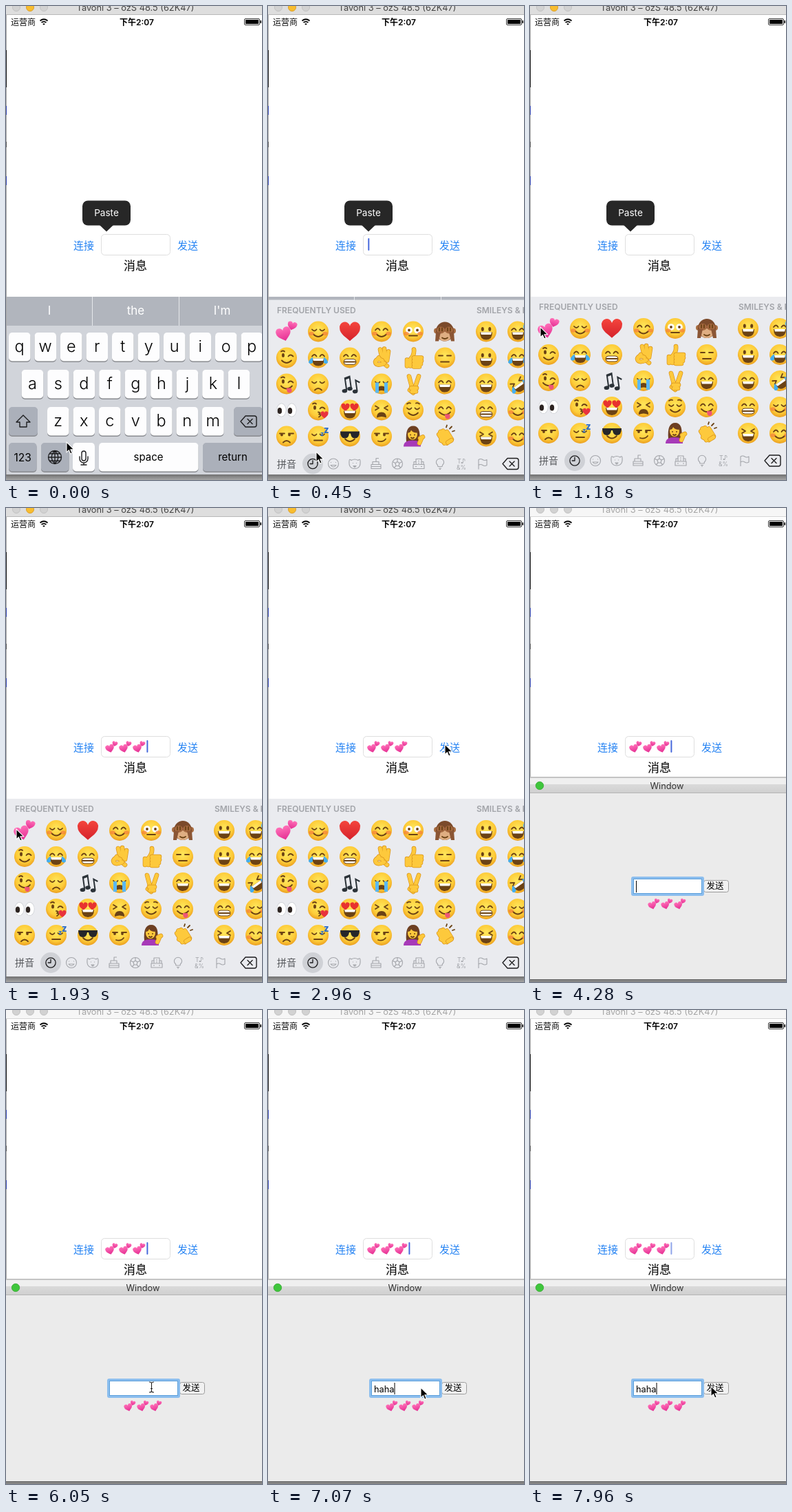
Write an HTML page that moves like this. It is 372 by 688 pixels and loops after 8000 ms.

```html
<!DOCTYPE html>
<html lang="zh">
<head>
<meta charset="utf-8">
<title>Messages</title>
<style>
  html, body { margin: 0; width: 100%; height: 100%; overflow: hidden; background: #fff; }
  svg { display: block; }
  text { font-family: Inter, "Noto Sans CJK SC", "Noto Sans CJK", sans-serif; white-space: pre; }
  .l { fill: none; stroke: #6b4214; stroke-width: 1.8; stroke-linecap: round; stroke-linejoin: round; }
  .icon { fill: none; stroke: #a3a5aa; stroke-width: 1.1; stroke-linejoin: round; }
  .dark { fill: none; stroke: #1d1d1f; stroke-width: 1.4; stroke-linejoin: round; stroke-linecap: round; }
</style>
</head>
<body>
<script>
const BROWN = '#6b4214', BLUE = '#2583f3';

// Markup helpers
const G = (x, y, body, more = '') => `<g transform="translate(${x} ${y}) ${more}">${body}</g>`;
const R = (x, y, w, h, fill, rx = 0, more = '') =>
  `<rect x="${x}" y="${y}" width="${w}" height="${h}" fill="${fill}" rx="${rx}" ${more}/>`;
const O = (x, y, rx, fill, ry = rx) => `<ellipse cx="${x}" cy="${y}" rx="${rx}" ry="${ry}" fill="${fill}"/>`;
const F = (d, fill) => `<path d="${d}" fill="${fill}"/>`;
const L = (d, cls = 'l') => `<path d="${d}" class="${cls}"/>`;
const T = (x, y, s, size, fill = '#000', more = 'text-anchor="middle"') =>
  `<text x="${x}" y="${y}" font-size="${size}" fill="${fill}" ${more}>${s}</text>`;
const use = (id, x, y, k = 1) => `<use href="#${id}" transform="translate(${x} ${y}) scale(${k})"/>`;
const part = (id, body) => `<g id="${id}">${body}</g>`;
const both = m => m + `<g transform="scale(-1 1)">${m}</g>`;

// Emoji
const HEART = 'M0 12C-4 8-13 3-13-4A6.6 6.6 0 0 1 0-7A6.6 6.6 0 0 1 13-4C13 3 4 8 0 12Z';
const heart = (x, y, k, fill, turn = 0) => G(x, y, F(HEART, fill), `rotate(${turn}) scale(${k})`);

const eyes = {
  dot: both(O(5.2, -3.5, 2, BROWN, 3)),
  arc: both(L('M2.5-2q3-5 6.5 0')),
  shut: both(L('M2.5-3q3 4 6.5 0')),
  flat: both(L('M3-3h6')),
  wink: O(-5, -3.5, 2, BROWN, 3) + L('M2.5-2q3-4 7 0M-8-9q3-2 5 0'),
  pinch: both(L('M9-6l-5 3 5 3')),
  love: both(heart(6.5, -4, .46, '#e8322f')),
  wide: both(O(6, -2, 4.8, '#fff') + O(6, -2, 1.9, BROWN)),
  cool: F('M-14-7H14q0 10-7 10-5 0-6-7h-2q-1 7-6 7-7 0-7-10z', '#25262a'),
  side: both(L('M3-4h7')) + O(-7, -2, 1.9, BROWN) + O(4, -2, 1.9, BROWN)
};
const mouths = {
  smile: L('M-7 4q7 7 14 0'),
  open: F('M-9 1H9q0 11-9 11T-9 1z', BROWN) + F('M-8 1H8l-1 3.5H-7z', '#fff'),
  teeth: R(-9, 2, 18, 8, '#fff', 4, `stroke="${BROWN}"`) + L('M-8 6H8'),
  flat: L('M-6 6H6'),
  frown: L('M-5 9q5-5 10 0'),
  smirk: L('M-5 7q7 2 11-3'),
  wail: F('M-7 11q0-8 7-8t7 8q-7-3-14 0z', BROWN),
  kiss: L('M0 3q5 1 1 3 5 1 0 4'),
  tongue: L('M-8 3q8 8 16 0') + F('M0 6h7q2 7-3 7-4 0-4-7z', '#ef5674')
};
const blush = `<g opacity=".65">${both(O(10, 3, 3.8, '#f4793b', 2.8))}</g>`;
const tears = both(F('M8-1q6 4 6 8a3.5 3.5 0 0 1-6 0z', '#43aef0'));
const streams = both(F('M4-2h5v15h-5z', '#59b8f4'));
const drop = F('M11-15q6 7 3 10t-6 0q-1-3 3-10z', '#4fb3f2');
const face = (eye, mouth, extra = '') => O(0, 0, 15, 'url(#skin)') + eyes[eye] + mouths[mouth] + extra;
const fingers = d => `<g fill="none" stroke-linecap="round" stroke-linejoin="round">
  <path d="${d}" stroke="#d8921b" stroke-width="6.6"/><path d="${d}" stroke="#fdc93c" stroke-width="5.2"/></g>`;

const emoji = {
  hearts: heart(-4, 4, .82, 'url(#pink)', -16) + heart(8, -8, .52, 'url(#pink)', 14),
  heart: heart(0, 0, 1.14, 'url(#red)'),
  relaxed: face('shut', 'smile', blush),
  glad: face('arc', 'smile', blush),
  shock: face('wide', 'flat', blush),
  monkey: both(O(12, -1, 4, '#a86d42')) + O(0, 0, 13, '#7b4a2b', 14) + O(0, 7, 9, '#dfae82', 7) +
    L('M-4 9q4 3 8 0') + both(O(6, -2, 6, '#a3673f', 5) + F('M6 1h7l1 13h-5z', '#8b5635') + L('M4-5v4M8-5v4')),
  grin: face('dot', 'open'),
  sweat: face('arc', 'open', drop),
  wink: face('wink', 'smile'),
  joy: face('arc', 'open', tears),
  teeth: face('arc', 'teeth'),
  ok: fingers('M1 2L-2-12M5 2L4-13M8 4L10-9M3 8L8 12') + fingers('M4 8q-12 5-13-2 2-6 10-2M-8 5L-4 0'),
  thumb: fingers('M-4 2Q2-4 1-12M-9 3L-9 12M-4 5V12') + fingers('M1 0H12M1 4.5H12M1 9H11M1 13H9'),
  blank: face('flat', 'flat'),
  tongue: face('wink', 'tongue'),
  sad: face('shut', 'frown'),
  notes: `<g transform="rotate(-8)">${F('M-7-10L2-12V7h-2V-8L-5-7V9h-2zM8-6l7 5-1 2-4-3V12H8z', '#2b3238')}` +
    O(-9, 9, 3.8, '#2b3238', 2.8) + O(-1, 7, 3.8, '#2b3238', 2.8) + O(6, 12, 3.8, '#2b3238', 2.8) + '</g>',
  cry: face('shut', 'wail', streams),
  peace: fingers('M-2 4L-6-11M3 4L8-11M-5 9L0 13') + fingers('M-3 6H5M-2 11H4'),
  laugh: face('arc', 'open'),
  rofl: `<g transform="rotate(-35)">${face('pinch', 'open', tears)}</g>`,
  look: both(O(7.5, 0, 7, '#c9ccd1', 10) + O(7.5, 0, 6.3, '#fff', 9.3)) + O(-10, 1, 3.2, '#2d2421', 4.5) + O(5, 1, 3.2, '#2d2421', 4.5),
  kiss: face('wink', 'kiss', heart(9, 7, .42, '#e8323d')),
  love: face('love', 'open'),
  weary: face('pinch', 'wail'),
  calm: face('shut', 'smile', L('M-9-9q3-2 5-1M9-9q-3-2-5-1')),
  yum: face('arc', 'tongue'),
  bored: face('side', 'frown'),
  sleep: face('shut', 'flat', T(8, -5, 'z', 13, '#2d6cc8', 'font-weight="800"') + T(3, -1, 'z', 9, '#2d6cc8', 'font-weight="800"')),
  cool: face('cool', 'smile'),
  smirk: face('side', 'smirk'),
  woman: F('M-10 8Q-12-15 0-15T9 8z', '#6d3f22') + F('M-14 15q0-9 13-9t12 9z', '#a73ab8') +
    O(-1, -3, 7, '#fdc93c', 8) + F('M-8-5q2-7 8-7 6 1 6 7-7 0-9-4-1 4-5 4z', '#6d3f22') +
    L('M-4-2h.1M2-2h.1M-3 2q2 2 4 0') + fingers('M9 10L12 3M10 3L14 1'),
  clap: `<g transform="rotate(-32)">${fingers('M-6-7V8M-2-9V8M2-8V8M6-4V9M-8 2L-3 10')}${fingers('M-1 10H5')}</g>` +
    L('M2-13l1-3M7-11l3-3M11-7l3-1'),
  giggle: face('pinch', 'open')
};
const rows = [
  'hearts relaxed heart glad shock monkey grin sweat',
  'wink joy teeth ok thumb blank grin joy',
  'tongue sad notes cry peace laugh laugh rofl',
  'look kiss love weary calm yum teeth relaxed',
  'bored sleep cool smirk woman clap giggle glad'
];
const columns = [27, 73, 119, 165, 211, 257, 317, 363];

// Keyboards
const key = (x, y, w, fill = '#fdfdfe') => R(x, y + 1, w, 42, '#898b90', 5) + R(x, y, w, 41.5, fill, 5);
const GREY = '#abb0ba';
const letters = (s, x, y) => [...s].map((c, i) =>
  key(x + i * 37.5, y, 31.5) + T(x + i * 37.5 + 15.7, y + 28, c, 23.5, '#000', 'text-anchor="middle" font-weight="300"')).join('');
const backspace = G(352, 0, L('M-11 0L-4-8H9q3 0 3 3V5q0 3-3 3H-4zM-1-3.5L6 3.5M6-3.5L-1 3.5', 'dark'));

const keyboard = R(1, 422, 371, 258, '#d1d4da') + R(1, 422, 371, 42, '#b1b5bd') +
  R(125, 422, 1, 42, '#e6e8eb') + R(251, 422, 1, 42, '#e6e8eb') +
  T(63, 448, 'I', 17, '#fff') + T(188.5, 448, 'the', 17, '#fff') + T(314, 448, "I'm", 17, '#fff') +
  letters('qwertyuiop', 4, 474) + letters('asdfghjkl', 22.7, 528) + letters('zxcvbnm', 60, 582) +
  key(4, 582, 42, GREY) + G(25, 603, L('M0-9L10 1H5V8H-5V1H-10z', 'dark')) +
  key(331, 582, 42, GREY) + G(0, 603, backspace) +
  key(4, 634, 40.5, GREY) + T(24.2, 661, '123', 15.5) +
  key(51, 634, 40.5, GREY) +
  G(71, 655, L('M-10 0a10 10 0 1 0 20 0a10 10 0 1 0-20 0H10M0-10V10M0-10q-10 10 0 20q10-10 0-20M-8-5.5H8M-8 5.5H8', 'dark'), 'scale(.95)') +
  key(97, 634, 32) +
  G(113, 655, L('M-3-6a3 3 0 0 1 6 0V2a3 3 0 0 1-6 0zM-6-1V2a6 6 0 0 0 12 0V-1M0 8V11M-4 11H4', 'dark')) +
  key(135, 634, 144.5) + T(207, 660, 'space', 15) +
  key(286, 634, 90, GREY) + T(329.5, 660, 'return', 15);

const icon = (x, d) => G(x, 660, L(d, 'icon'));
const ring = r => `M${-r} 0a${r} ${r} 0 1 0 ${2 * r} 0a${r} ${r} 0 1 0 ${-2 * r} 0`;
const HEAD = 'font-weight="600"';
const panel = R(1, 422, 371, 258, '#eaebef') +
  T(13, 441, 'FREQUENTLY USED', 12, '#a2a4a9', HEAD) + T(303, 441, 'SMILEYS &amp; PEOPLE', 12, '#a2a4a9', HEAD) +
  rows.map((row, j) => row.split(' ').map((id, i) => use(id, columns[i], 468 + 38 * j)).join('')).join('') +
  T(27, 665, '拼音', 14, '#55575b') + O(65, 660, 15, '#cfd1d6') +
  G(65, 660, `<g style="stroke:#6a6c70">${L(ring(7.5) + 'M0-5V0H-4', 'dark')}</g>`, 'scale(.95)') +
  icon(95, ring(7.5) + 'M-4-2h1M3-2h1M-4 2q4 5 8 0z') +
  icon(126, 'M-5-5q-3-3-3 1-1 11 8 11t8-11q0-4-3-1-5-3-10 0M-3-1h1M2-1h1M-2 3h4l-2 2z') +
  icon(157, 'M-7 7H7V1H-7zM-5 1V-3H4V1M-7 4H7M0-3V-8h4') +
  icon(188, ring(7.5) + 'M0-3l3 2-1 4h-4l-1-4zM0-3V-7M3-1l4-2M2 3l3 3M-2 3l-3 3M-3-1l-4-2') +
  icon(219, 'M-4 1V-7H4V1M-8 7V1H8V7zM-1-4h2M-1-1h2M-5 4h2M3 4h2M-7 1v-4h3M7 1v-4h-3') +
  icon(250, 'M-3 4q0-2-2-4a5.5 5.5 0 1 1 10 0q-2 2-2 4zM-2 6.5h4M-1 8h2') +
  T(281, 659, 'T♪', 9, '#a3a5aa') + T(281, 668, '&amp;%', 8.5, '#a3a5aa') +
  icon(312, 'M-6 8V-6q3-2 6 0t6 0V2q-3 2-6 0t-6 0') +
  G(0, 660, backspace);

// Phone window
const titleBar = (id, top, low, text, mid) => part(id,
  R(0, 0, 372, 12, top) + R(0, 12, 372, 1, low) +
  [15, 35, 55].map(x => `<circle cx="${x}" cy="2" r="5.5" fill="${x === 35 ? mid : '#d2d2d2'}" stroke="${x === 35 && id === 'active' ? '#dca02d' : '#c2c2c2'}"/>`).join('') +
  T(188, 7, 'Tavoni 3 – ozS 48.5 (62K47)', 12.8, text));

const phone = R(0, 0, 372, 688, '#fff') +
  titleBar('active', '#dedede', '#b9b9b9', '#454545', '#f8bd2f') + titleBar('inactive', '#f6f6f6', '#d6d6d6', '#a6a6a6', '#d2d2d2') +
  T(7, 27.5, '运营商', 12, '#111', '') +
  G(55, 27, `<g fill="none" stroke="#000" stroke-width="1.7"><path d="M-5.5-5.5q5.5-4.5 11 0M-3.4-3q3.4-2.8 6.8 0"/></g>` + F('M0 .8L-1.8-1q1.8-1.3 3.6 0z', '#000')) +
  T(190, 27.5, '下午2:07', 12, '#000', 'text-anchor="middle" font-weight="600"') +
  R(346.5, 18.5, 22, 9, 'none', 1.5, 'stroke="#000" stroke-width=".8"') + R(348, 20, 19, 6, '#000') + R(369.5, 21, 1.5, 4, '#000') +
  T(113, 352.6, '连接', 15, BLUE) + T(264, 352.6, '发送', 15, BLUE) +
  R(138.5, 331.5, 100, 30, '#fff', 5, 'stroke="#dedede"') +
  [0, 1, 2].map(i => part('sent' + i, use('hearts', 153.5 + 20 * i, 347, .58))).join('') +
  R(0, 337, 2, 18, '#4668dc', 1, 'id="caret"') +
  T(188, 382.7, '消息', 17) +
  part('paste', R(111, 282.5, 70, 36, '#272727', 8) + F('M136 318h20l-10 9.5z', '#272727') + T(146, 305, 'Paste', 13.6, '#fff')) +
  part('keyboard', keyboard) + part('panel', panel) +
  R(0, 13, 1, 668, '#a9a9a9') + R(0, 64, 1, 54, '#111') + R(0, 145, 1, 13, '#3244b4') + R(0, 197, 1, 8, '#555') + R(0, 247, 1, 13, '#3244b4') +
  R(0, 680, 372, 8, 'url(#shade)');

// Desktop window
const desktop = part('desktop',
  R(0, 390, 372, 2, '#c4c4c4') + R(0, 392, 372, 9, '#efefef') + R(0, 401, 372, 12, 'url(#bar)') + R(0, 413, 372, 1, '#b4b4b4') +
  `<circle cx="14" cy="403" r="5.7" fill="#3fc63c" stroke="#35a832" stroke-width=".8"/>` +
  T(199, 408, 'Window', 12.8, '#333') +
  R(0, 414, 372, 270, '#ebebeb') + R(0, 684, 372, 4, '#858585') + R(0, 684, 372, 1, '#5f5f5f') +
  R(252.5, 540.5, 36, 17, '#f1f1f1', 3, 'stroke="#9c9c9c"') + T(269, 553.3, '发送', 12.5) +
  R(147, 535, 106, 28, '#8cbeee', 3) + R(150.5, 538.5, 99, 21, '#fff', 0, 'stroke="#5b9fdb"') +
  T(154, 554.5, '', 12.8, '#000', 'id="typed"') + R(0, 541, 1, 17, '#000', 0, 'id="bar-caret"') +
  [180, 199, 218].map(x => use('hearts', x, 575, .54)).join(''));

const pointers = `<path id="arrow" d="M0 0V14.8L3.4 11.6 5.7 17 8.2 16 5.9 10.7H10.6z" fill="#000" stroke="#fff" stroke-width="1.1"/>` +
  `<path id="beam" d="M-3.5-7.5q3 0 3.5 1.5.5-1.5 3.5-1.5M0-6V6M-3.5 7.5q3 0 3.5-1.5.5 1.5 3.5 1.5M-1.5 2h3" fill="none" stroke="#222" stroke-width="1.1"/>`;

const stop = (at, c) => `<stop offset="${at}" stop-color="${c}"/>`;
const linear = (id, a, b) => `<linearGradient id="${id}" x2="0" y2="1">${stop(0, a)}${stop(1, b)}</linearGradient>`;
document.body.innerHTML = `<svg width="372" height="688" viewBox="0 0 372 688"><defs>
  <radialGradient id="skin" cy=".4" r=".62">${stop(0, '#ffe75c') + stop(.65, '#fdcb38') + stop(1, '#e99a1d')}</radialGradient>
  ${linear('pink', '#ff70b8', '#e42d92')}${linear('red', '#f4453d', '#d5222b')}
  ${linear('shade', '#717171', '#a6a6a6')}${linear('bar', '#dadada', '#d0d0d0')}
  ${Object.entries(emoji).map(([id, body]) => part(id + '', body)).join('')}
  </defs>${phone}${desktop}${pointers}</svg>`;

const STEP = 147.5, LOOP = 8000;
const el = id => document.getElementById(id);
const show = (id, on) => el(id).style.display = on ? '' : 'none';
const place = (id, x, y) => el(id).setAttribute('transform', `translate(${x} ${y})`);

const toSend = [[0, 88, 633], [2, 70, 647], [4, 70, 647], [8, 15, 466], [13, 15, 466], [15, 288, 352], [16, 282, 354], [17, 264, 360], [20, 257, 343]];
const toButton = [[48, 222, 548], [51, 298, 547], [52, 305, 549], [53, 277, 547], [54, 263, 546]];

function along(path, n) {
  const i = path.findIndex(p => p[0] >= n);
  if (i < 1) return path.at(i).slice(1);
  const [a, b] = [path[i - 1], path[i]], u = (n - a[0]) / (b[0] - a[0]);
  return [1, 2].map(k => a[k] + (b[k] - a[k]) * u);
}

function caretOpacity(n) {
  if (n >= 9 && n < 16) return 1;
  const s = n * STEP / 1000;
  const turn = n < 9 ? s - .6 : (s - 4.25) / .9875;
  return Math.max(0, Math.min(1, .5 + 1.3 * Math.cos(2 * Math.PI * turn)));
}

function draw(ms) {
  const n = Math.floor((ms + 10) / STEP);
  const mac = n >= 27;
  show('active', !mac);
  show('inactive', mac);
  show('desktop', mac);
  show('paste', n < 9);
  show('panel', n >= 2);
  place('panel', 0, n < 3 ? 70 : n < 4 ? 4.5 : 0);

  const count = [9, 11, 13].filter(k => n >= k).length;
  for (let i = 0; i < 3; i++) show('sent' + i, i < count);
  el('caret').setAttribute('x', 145.3 + 19.7 * count);
  el('caret').setAttribute('opacity', caretOpacity(n));

  const typed = 'haha'.slice(0, n < 44 ? 0 : n < 45 ? 1 : n < 46 ? 3 : 4);
  el('typed').textContent = typed;
  el('bar-caret').setAttribute('x', typed ? 154 + el('typed').getComputedTextLength() : 154);
  show('bar-caret', [33, 37, 41, 44, 50, 54].filter(k => n >= k).length % 2 === 0);

  show('arrow', !mac || n >= 48);
  place('arrow', ...along(mac ? toButton : toSend, n));
  show('beam', n >= 33 && n < 44);
  place('beam', n < 34 ? 218 : 211.5, n < 34 ? 549 : 547.5);
}

function tick() {
  draw(performance.now() % LOOP);
  requestAnimationFrame(tick);
}
tick();
</script>
</body>
</html>
```
